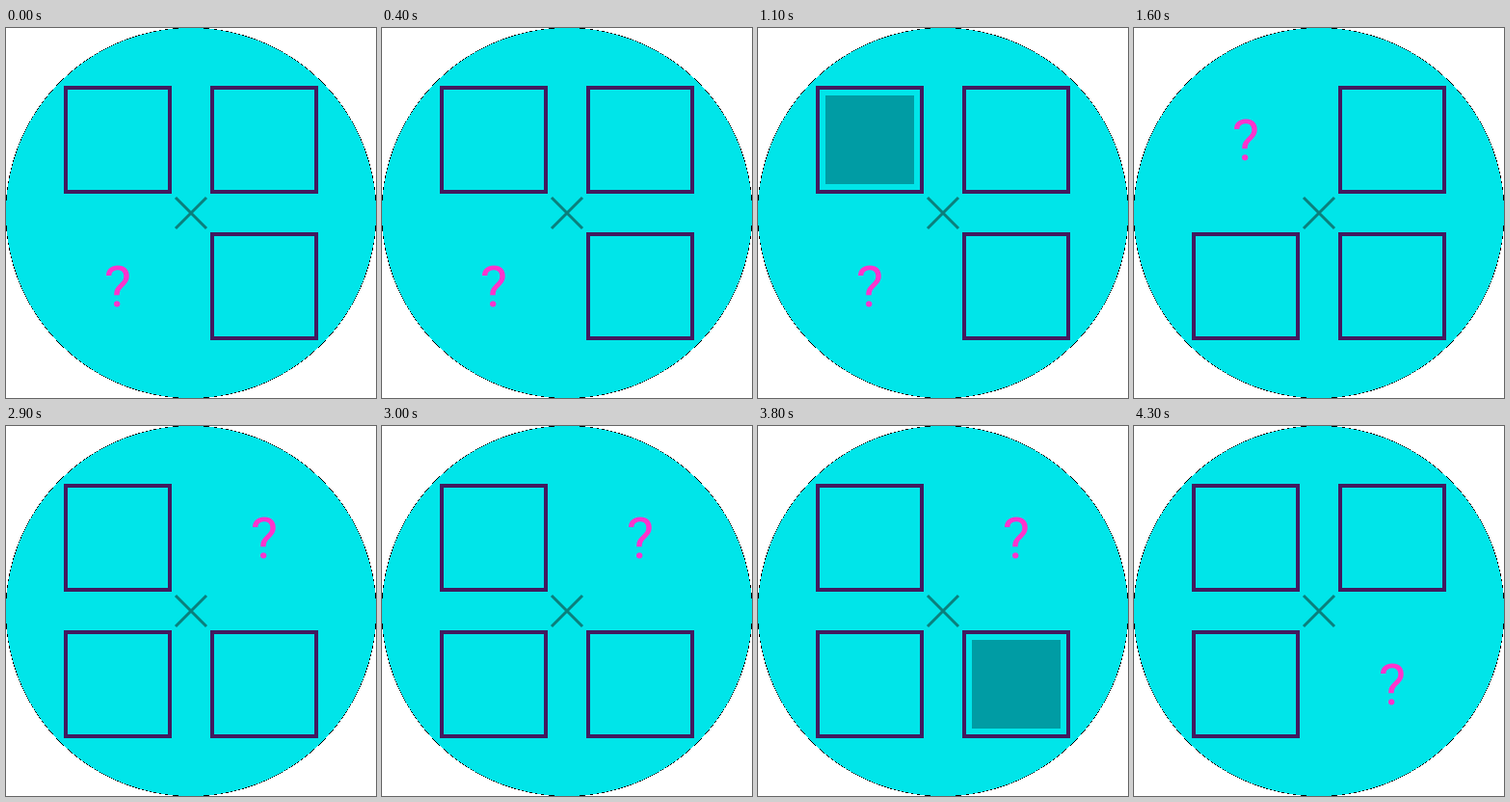
Animation, 384 px wide and 384 px high, one loop 6400 ms. Source, as an HTML page with a canvas:

```html
<!DOCTYPE html>
<html lang="en">
<head>
<meta charset="utf-8">
<title>Rotating squares</title>
<style>
  html, body { margin: 0; width: 100%; height: 100%; overflow: hidden; background: #fff; }
  canvas { display: block; width: 384px; height: 384px; }
</style>
</head>
<body>
<canvas id="stage" width="384" height="384"></canvas>
<script>
const SIZE = 384, MID = SIZE / 2, LOOP = 6400;
const CYAN = '#00e5e9', EDGE = '#000', FRAME = '#431a5e';
const FILL = '#009ca4', CROSS = '#0b7f7c', PINK = '#ff33cc';

// Slots clockwise from the lower left, given by their centres.
const slots = [[116, 268], [116, 116], [268, 116], [268, 268]];

// Each step: when its gap opens, and when the next slot lights up.
const steps = [
  { start: 0, lit: 1100 },
  { start: 1600, lit: 2400 },
  { start: 2900, lit: 3800 },
  { start: 4300, lit: Infinity }
];

const ctx = document.getElementById('stage').getContext('2d');
const disc = makeDisc();

// Hard-edged disc with a broken dark rim of single pixels.
function makeDisc() {
  const layer = document.createElement('canvas');
  layer.width = layer.height = SIZE;
  const g = layer.getContext('2d');
  for (let y = 0; y < SIZE; y++) {
    for (let x = 0; x < SIZE; x++) {
      const cover = MID + 0.5 - Math.hypot(x + 0.5 - MID, y + 0.5 - MID);
      if (cover < 0.1) continue;
      g.fillStyle = cover < 0.55 ? EDGE : CYAN;
      g.fillRect(x, y, 1, 1);
    }
  }
  return layer;
}

function drawCross() {
  ctx.strokeStyle = CROSS;
  ctx.lineWidth = 3;
  ctx.beginPath();
  ctx.moveTo(176, 176);
  ctx.lineTo(208, 208);
  ctx.moveTo(208, 176);
  ctx.lineTo(176, 208);
  ctx.stroke();
}

function drawSquare([x, y], lit) {
  ctx.strokeStyle = FRAME;
  ctx.lineWidth = 4;
  ctx.strokeRect(x - 54, y - 54, 108, 108);
  if (lit) {
    ctx.fillStyle = FILL;
    ctx.fillRect(x - 46, y - 46, 92, 92);
  }
}

function drawQuestion([x, y]) {
  ctx.fillStyle = PINK;
  ctx.font = '60px Roboto, sans-serif';
  ctx.textAlign = 'center';
  ctx.fillText('?', x, y + 21);
}

function draw(t) {
  const gap = steps.findLastIndex(s => t >= s.start);
  ctx.clearRect(0, 0, SIZE, SIZE);
  ctx.drawImage(disc, 0, 0);
  drawCross();
  slots.forEach((slot, i) => {
    if (i === gap) drawQuestion(slot);
    else drawSquare(slot, i === gap + 1 && t >= steps[gap].lit);
  });
}

const origin = performance.now();
function tick() {
  draw((performance.now() - origin) % LOOP);
  requestAnimationFrame(tick);
}
tick();
</script>
</body>
</html>
```
